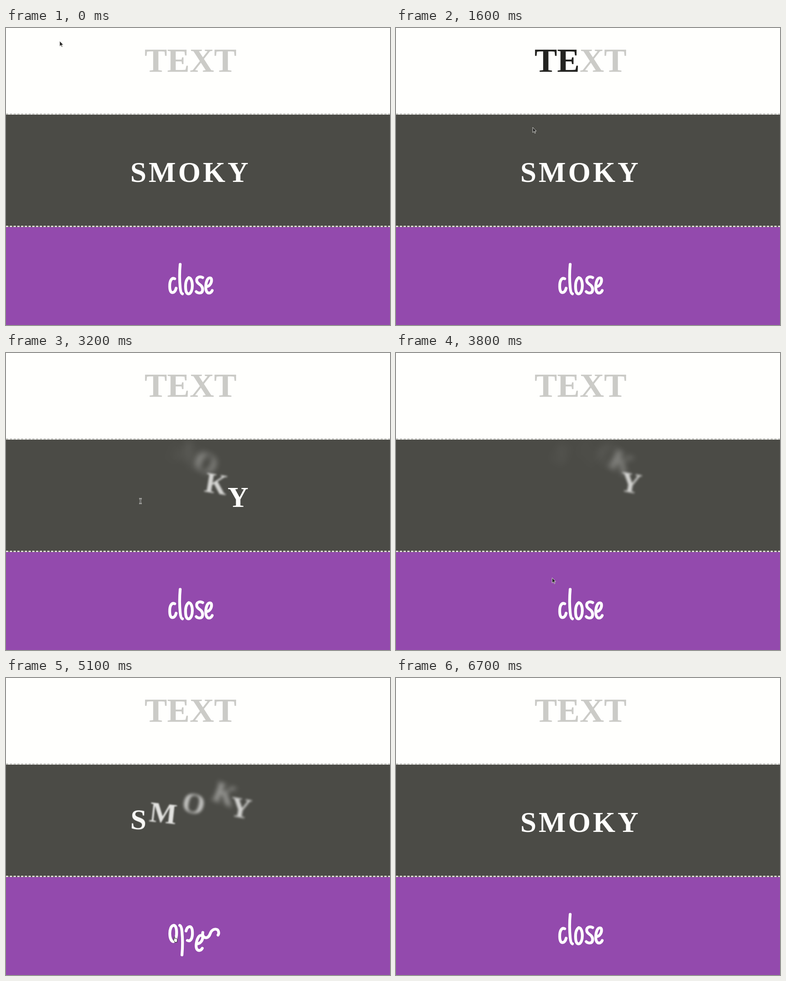
These frames come from a looping animation (851x658 px, 7.3 s). An HTML page:

```html
<!DOCTYPE html>
<html lang="en">
<head>
<meta charset="utf-8">
<title>Text effects</title>
<style>
  html, body { margin: 0; width: 100%; height: 100%; overflow: hidden; background: #fffffd; }
  svg { display: block; }
  text { font-family: "Liberation Serif", "Times New Roman", serif; font-weight: bold; }
  .heading { font-size: 75px; }
  .smoke { font-size: 64px; fill: #fffffd; text-anchor: middle; }
  .border { stroke-width: 3; stroke-dasharray: 5.3 3; }
  .hand { fill: none; stroke: #fff; stroke-width: 6.2; stroke-linecap: round; stroke-linejoin: round; }
</style>
</head>
<body>
<svg width="851" height="658" viewBox="0 0 851 658">
  <clipPath id="clip"><rect id="wipe" x="307" y="30" width="0" height="90"/></clipPath>
  <text class="heading" x="306.9" y="96.5" fill="#cbcbc7">TEXT</text>
  <text class="heading" x="306.9" y="96.5" fill="#242421" clip-path="url(#clip)">TEXT</text>
  <path class="border" d="M0 190.5H851" stroke="#cbcbc7"/>

  <rect y="192" width="851" height="249" fill="#4b4b46"/>
  <path class="border" d="M0 439.5H851" stroke="#dcdcd2"/>
  <g id="smoky"></g>

  <rect y="441" width="851" height="217" fill="#934aad"/>
  <g class="hand">
    <g id="clo">
      <path d="M374 555.5C366 552 362.5 562 362.8 573C363 583 366 587 370 586C374 585 376 581 377 576.5"/>
      <path d="M386 523.5C384.5 540 384.5 560 386 575C386.7 583 388 588 391 589"/>
      <path d="M405 553C399 557 397.5 567 398 576C398.5 585 401 589.5 405 589C410 588 413 580 413 571C413 561 410 553.5 405 553"/>
    </g>
    <path id="s" d="M436 553C430 549.5 423 552 422.5 558C422 565 429 567 433 571.5C438 578 436 586.5 430 587C426 587.3 423 586 421.5 584"/>
    <path id="e" d="M445 573C451 572 456 565 455.5 558C455 552 449 552 446 558C442 566 441.5 579 445 584.5C449 589.5 455 587 457 581.5"/>
  </g>

  <g id="cursor">
    <path d="M0 0V11.5L2.7 9L4.6 13.2L6.3 12.5L4.5 8.4H8Z" fill="#222" stroke="#e8e8e4" stroke-width=".9"/>
    <g fill="none">
      <path id="beam" d="M-2.5 .8Q0 .8 0 2.5V9.5Q0 11.2 -2.5 11.2M2.5 .8Q0 .8 0 2.5V9.5Q0 11.2 2.5 11.2" stroke="#e8e8e4" stroke-width="2.4"/>
      <use href="#beam"/>
      <path d="M-2.5 .8Q0 .8 0 2.5V9.5Q0 11.2 -2.5 11.2M2.5 .8Q0 .8 0 2.5V9.5Q0 11.2 2.5 11.2" stroke="#333" stroke-width=".9"/>
    </g>
    <path d="M2.5 7.5V1.5Q3.3 .3 4.2 1.5V5L8.6 5.8Q10 6.2 9.8 8L9 11.5V13.5H4V12L.6 8.6Q.8 6.8 2.5 8.2Z" fill="#fff" stroke="#222" stroke-width="1"/>
  </g>
</svg>
<script>
const LOOP = 7300, STEP = 100;
const $ = id => document.getElementById(id);
const clamp = x => Math.min(1, Math.max(0, x));

// The CSS "ease" curve: cubic-bezier(.25, .1, .25, 1)
function ease(p) {
  if (p <= 0 || p >= 1) return clamp(p);
  const bez = (a, b, u) => 3 * a * u * (1 - u) ** 2 + 3 * b * u * u * (1 - u) + u ** 3;
  let lo = 0, hi = 1;
  for (let i = 0; i < 24; i++) {
    const mid = (lo + hi) / 2;
    if (bez(.25, .25, mid) < p) lo = mid; else hi = mid;
  }
  return bez(.1, 1, lo);
}
const run = (t, start, dur) => ease((t - start) / dur);

// Smoke: each letter starts a little later, both on entering and on leaving
const SMOKE = { enter: 1610, leave: 3630, delay: 415, dur: 2000 };
function smokeAt(t, i) {
  const { enter, leave, delay, dur } = SMOKE;
  const peak = run(Math.min(t, leave), enter + delay * i, dur);
  return peak * (1 - run(t, leave + delay * i, dur * (peak || 1)));
}
const centers = [293.3, 346.3, 406.4, 461.2, 514.2];
const letters = [..."SMOKY"].map(ch => {
  const el = document.createElementNS("http://www.w3.org/2000/svg", "text");
  el.setAttribute("class", "smoke");
  el.setAttribute("y", 21);
  el.textContent = ch;
  return $("smoky").appendChild(el);
});

// Pointer path: time, x, y
const path = [
  [300, 119, 29], [600, 335, 70], [1300, 335, 70], [1600, 303, 220],
  [1800, 298, 322], [3600, 298, 322], [3700, 331, 392], [3800, 346, 498],
  [3900, 346, 498], [4000, 370, 572], [5700, 370, 572], [6300, 177, 238], [6400, 120, 32]
];
function pointerAt(t) {
  const n = path.findIndex(k => k[0] > t);
  if (n === 0) return path[0].slice(1);
  if (n < 0) return path.at(-1).slice(1);
  const [t0, x0, y0] = path[n - 1], [t1, x1, y1] = path[n];
  const p = (t - t0) / (t1 - t0);
  return [x0 + (x1 - x0) * p, y0 + (y1 - y0) * p];
}
const shapes = [...$("cursor").children];

function draw(t) {
  const set = (el, value) => el.setAttribute("transform", value);

  $("wipe").setAttribute("width", 204.2 * (run(t, 526, 700) - run(t, 1390, 700)));

  letters.forEach((el, i) => {
    const v = smokeAt(t, i);
    set(el, `translate(${centers[i]} 320) rotate(${40 * v}) translate(0 ${-130 * v})`);
    el.style.opacity = 1 - v;
    el.style.filter = v > .002 ? `blur(${10 * v}px)` : "none";
  });

  const flip = run(t, 3960, 520) - run(t, 5800, 550);
  const swap = run(t, 4640, 660) - run(t, 5850, 800);
  set($("clo"), `rotate(${180 * flip} 388 568.5)`);
  set($("s"), `translate(${26 * swap} ${-3 * swap}) rotate(${-112 * swap} 429 569)`);
  set($("e"), `translate(${-22 * swap} ${16 * swap + 8 * Math.sin(Math.PI * swap)}) rotate(${6 * swap} 450 569)`);

  const kind = t >= 1800 && t < 3700 ? 1 : t >= 4000 && t < 5800 ? 2 : 0;
  shapes.forEach((el, i) => el.style.display = i === kind ? "" : "none");
  $("cursor").style.display = t < 6700 ? "" : "none";
  set($("cursor"), `translate(${pointerAt(t)})`);
}

const begin = performance.now();
function tick() {
  const t = (performance.now() - begin) % LOOP;
  draw(Math.floor(t / STEP) * STEP);
  requestAnimationFrame(tick);
}
tick();
</script>
</body>
</html>
```
